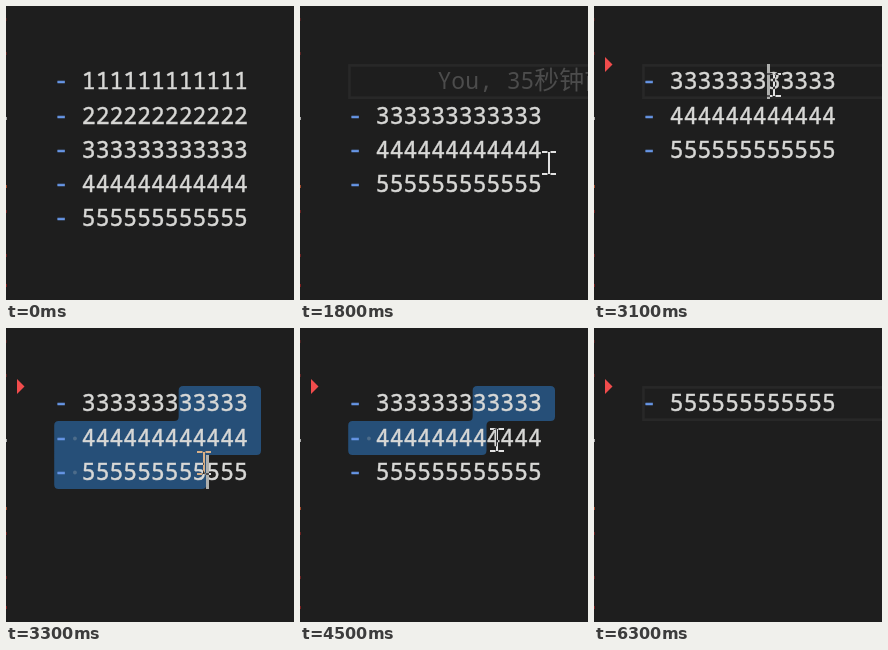
Recreate the animation shown at these times as an HTML page. Size 288 by 294 pixels, loop 6400 ms.

```html
<!DOCTYPE html>
<html lang="zh">
<head>
<meta charset="utf-8">
<style>
  html, body { margin: 0; width: 100%; height: 100%; overflow: hidden; background: #1e1e1e; }
  svg { display: block; width: 288px; height: 294px; }
  text { font: 23.05px "Noto Sans Mono", "DejaVu Sans Mono", monospace; white-space: pre; fill: #d8d8d6; stroke: #d8d8d6; stroke-width: .45; }
  .dash { fill: #6796e6; stroke: #6796e6; }
  .blame { fill: #4c4c4c; stroke: none; }
  .cjk { font: 25px "Noto Sans CJK SC", "Noto Sans CJK", sans-serif; }
  .beam { fill: none; stroke: #fff; stroke-width: 2; mix-blend-mode: difference; }
</style>
</head>
<body>
<svg viewBox="0 0 288 294">
  <rect width="288" height="294" fill="#1e1e1e"/>
  <g id="marks"></g>
  <g id="view"></g>
</svg>
<script>
const LOOP = 6400, LEFT = 48.2, PITCH = 13.83, LINE_END = 255;
const colX = c => LEFT + c * PITCH;
const rowY = r => Math.round(58.4 + 34.3 * r);
const baseY = r => Math.round(83.4 + 34.2 * r) - 0.3;
const rect = (x, y, w, h, fill) =>
  `<rect x="${x}" y="${y}" width="${w}" height="${h}" fill="${fill}"/>`;

// Each step lists only what changes; caret is [column, row], sel is the moving end of the selection.
const steps = [
  [0, { lines: '12345', caret: null, mouse: null, active: false, word: false, sel: null, blame: false, arrow: false }],
  [100, { mouse: [196, 80] }],
  [200, { mouse: [168, 78] }],
  [300, { mouse: [155, 77] }],
  [500, { active: true, caret: [7, 0] }],
  [700, { word: true, mouse: [222, 133] }],
  [800, { mouse: [249, 157] }],
  [1000, { caret: null }],
  [1400, { caret: [7, 0] }],
  [1800, { lines: ' 345', word: false, blame: true, caret: null }],
  [1900, { lines: '2345', blame: false, caret: [7, 0] }],
  [2000, { lines: '345' }],
  [2100, { arrow: true }],
  [2300, { caret: null }],
  [2700, { caret: [7, 0] }],
  [2800, { mouse: [238, 140] }],
  [2900, { mouse: [206, 102] }],
  [3000, { mouse: [183, 82] }],
  [3100, { mouse: [180, 79], caret: [9, 0] }],
  [3200, { mouse: [187, 108], active: false, sel: [10, 1], caret: [10, 1] }],
  [3300, { mouse: [198, 135], sel: [11, 2], caret: [11, 2] }],
  [3500, { mouse: [199, 136] }],
  [3800, { caret: null }],
  [4000, { mouse: [198, 130], caret: [11, 2] }],
  [4100, { mouse: [197, 116], sel: [10, 1], caret: [10, 1] }],
  [4200, { mouse: [197, 112] }],
  [4500, { caret: null }],
  [4900, { lines: '5', sel: null, active: true, caret: [10, 0] }],
  [5400, { mouse: [210, 92], caret: null }],
  [5500, { mouse: [229, 58] }],
  [5600, { mouse: null }],
  [5900, { caret: [10, 0] }],
  [6300, { caret: null }]
];

function rounded(points, radius) {
  const n = points.length;
  const toward = (a, b) => {
    const dx = b[0] - a[0], dy = b[1] - a[1];
    const k = Math.min(0.5, radius / Math.hypot(dx, dy));
    return [a[0] + dx * k, a[1] + dy * k];
  };
  return points.map((p, i) => {
    const from = toward(p, points[(i + n - 1) % n]);
    const to = toward(p, points[(i + 1) % n]);
    return `${i ? 'L' : 'M'}${from} Q${p} ${to}`;
  }).join(' ') + 'Z';
}

function selection([col, row]) {
  const start = colX(9), end = colX(col), top = rowY(0), mid = rowY(1);
  const last = rowY(row), bottom = rowY(row + 1);
  const points = [[start, top], [LINE_END, top], [LINE_END, last], [end, last],
    [end, bottom], [LEFT, bottom], [LEFT, mid], [start, mid]];
  let out = `<path d="${rounded(points, 4.5)}" fill="#264f78"/>`;
  for (let r = 1; r <= row; r++)
    out += `<circle cx="${colX(1.5)}" cy="${rowY(r) + 17.5}" r="1.9" fill="#4d6c8a"/>`;
  return out;
}

function textLine(digit, r) {
  if (digit === ' ') return '';
  const y = baseY(r);
  return `<text class="dash" x="${LEFT}" y="${y - 0.8}">-</text>` +
    `<text x="${colX(2)}" y="${y}">${digit.repeat(12)}</text>`;
}

function pointer([x, y]) {
  const top = y - 11, bottom = y + 11;
  return `<path class="beam" d="M${x - 7} ${top}h5.5M${x + 7} ${top}h-5.5` +
    `M${x} ${top}V${bottom}M${x - 7} ${bottom}h5.5M${x + 7} ${bottom}h-5.5"/>`;
}

function draw(s) {
  let out = '';
  if (s.active)
    out += `<rect x="49.4" y="59.4" width="260" height="32.3" fill="none" stroke="#282828" stroke-width="2.6"/>`;
  if (s.word) out += rect(75, 58, PITCH * 12 + 1, 35, '#343a41');
  if (s.sel) out += selection(s.sel);
  if (s.arrow) out += '<path d="M11 51L18.5 58.5L11 66Z" fill="#f14c4c"/>';
  out += [...s.lines].map(textLine).join('');
  if (s.blame)
    out += `<text class="blame" x="137.5" y="${baseY(0)}">You, 35<tspan class="cjk">秒钟前</tspan></text>`;
  if (s.caret) {
    const [c, r] = s.caret;
    out += rect(Math.round(colX(c)), rowY(r), 3, rowY(r + 1) - rowY(r), '#aeafad');
  }
  if (s.mouse) out += pointer(s.mouse);
  return out;
}

let state = {};
const scenes = steps.map(([at, change]) => {
  state = { ...state, ...change };
  return { at, svg: draw(state) };
});

// Slivers of the gutter at the left edge
document.getElementById('marks').innerHTML = [
  [12, '#4a2020'], [46, '#5a2323'], [111, '#a8a8a8'], [179, '#a04a2c'],
  [204, '#6a2020'], [248, '#6a2020'], [278, '#7a1c1c']
].map(([y, c]) => rect(0, y, 1, 3, c)).join('');

const view = document.getElementById('view');
let shown = null;
function tick() {
  const t = performance.now() % LOOP;
  const scene = scenes.findLast(s => s.at <= t);
  if (scene !== shown) {
    shown = scene;
    view.innerHTML = scene.svg;
  }
  requestAnimationFrame(tick);
}
tick();
</script>
</body>
</html>
```
